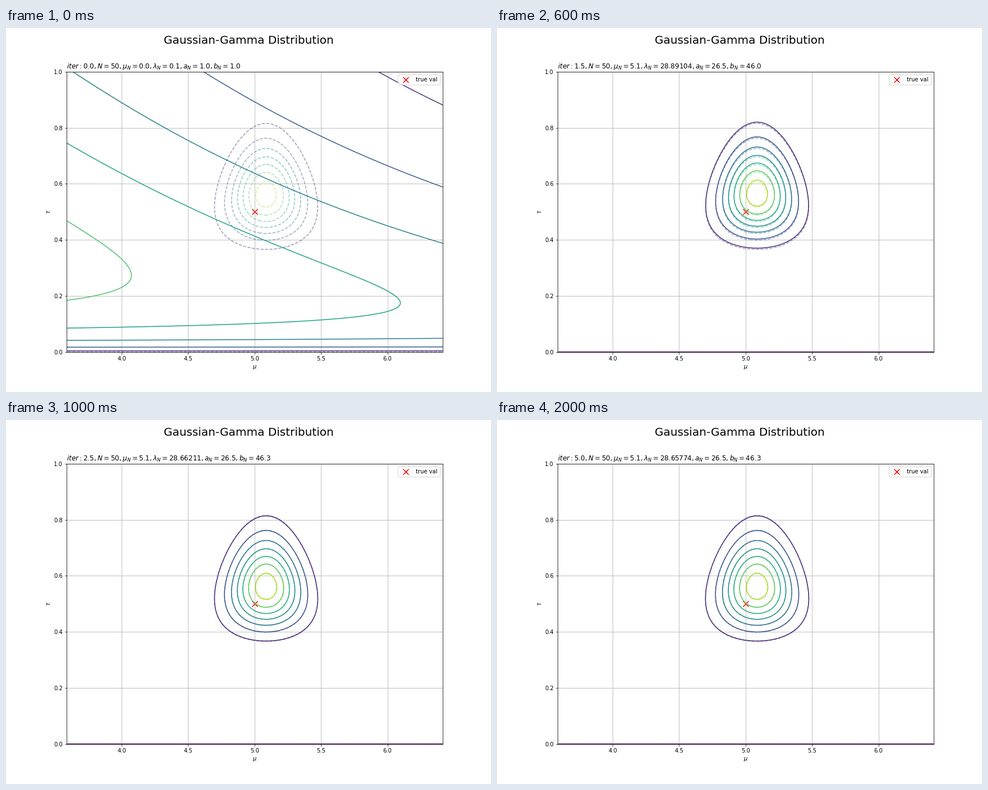
A matplotlib script that plays this animation: 864x648 px, repeating every 2200 ms.

```python
import math

import matplotlib.pyplot as plt
import numpy as np
from matplotlib.animation import FuncAnimation

FRAMES, INTERVAL = 11, 200
MU_TRUE, TAU_TRUE = 5.0, 0.5
SIGMA = 1 / math.sqrt(TAU_TRUE)

# Prior parameters and the data summary they are updated with
N = 50
MU_0, LAM_0, A_0, B_0 = 0.0, 0.1, 1.0, 1.0
MU_POST, B_POST = 5.087, 45.45369
LAM_POST = LAM_0 + N

# The grid reaches past the visible window, which sets the contour levels
mu_line = np.linspace(MU_TRUE - 4 * SIGMA, MU_TRUE + 4 * SIGMA, 500)
tau_line = np.linspace(0, 4 * TAU_TRUE, 500)
MU, TAU = np.meshgrid(mu_line, tau_line)


def density(mu, lam, a, b):
    """Gaussian-gamma density on the grid."""
    with np.errstate(all="ignore"):
        log_tau = np.log(TAU)
        log_gauss = 0.5 * (math.log(lam / (2 * math.pi)) + log_tau
                           - lam * TAU * (MU - mu) ** 2)
        log_gamma = (a * math.log(b) - math.lgamma(a)
                     + (a - 1) * log_tau - b * TAU)
        return np.ma.masked_invalid(np.exp(log_gauss + log_gamma))


def trace():
    """Parameters after each half step of the variational updates."""
    mu, lam, a, b = MU_0, LAM_0, A_0, B_0
    steps = [(mu, lam, a, b)]
    for k in range(1, FRAMES):
        if k % 2:
            mu, lam = MU_POST, LAM_POST * a / b
        else:
            a = A_0 + (N + 1) / 2
            b = B_POST + 0.5 * LAM_POST / lam
        steps.append((mu, lam, a, b))
    return steps


STEPS = trace()
POSTERIOR = density(MU_POST, LAM_POST, A_0 + N / 2, B_POST)

fig, ax = plt.subplots(figsize=(12, 9), dpi=72)
fig.suptitle("Gaussian-Gamma Distribution", fontsize=20)


def update(i):
    mu, lam, a, b = STEPS[i]
    ax.cla()
    ax.contour(MU, TAU, POSTERIOR, alpha=0.5, linestyles="--")
    ax.contour(MU, TAU, density(mu, lam * b / a, a, b))
    ax.scatter(MU_TRUE, TAU_TRUE, s=100, marker="x", color="red",
               label="true val")
    ax.set_xlim(MU_TRUE - SIGMA, MU_TRUE + SIGMA)
    ax.set_ylim(0, 2 * TAU_TRUE)
    ax.set_xlabel(r"$\mu$")
    ax.set_ylabel(r"$\tau$")
    ax.set_title(rf"$iter:{i / 2}, N={N}, \mu_N={round(mu, 1)}, "
                 rf"\lambda_N={round(lam, 5)}, a_N={round(a, 1)}, "
                 rf"b_N={round(b, 1)}$", loc="left")
    ax.grid()
    ax.legend(loc="upper right")
    return []


anim = FuncAnimation(fig, update, frames=FRAMES, init_func=lambda: [],
                     interval=INTERVAL, repeat=True, repeat_delay=0)
plt.show()
```
